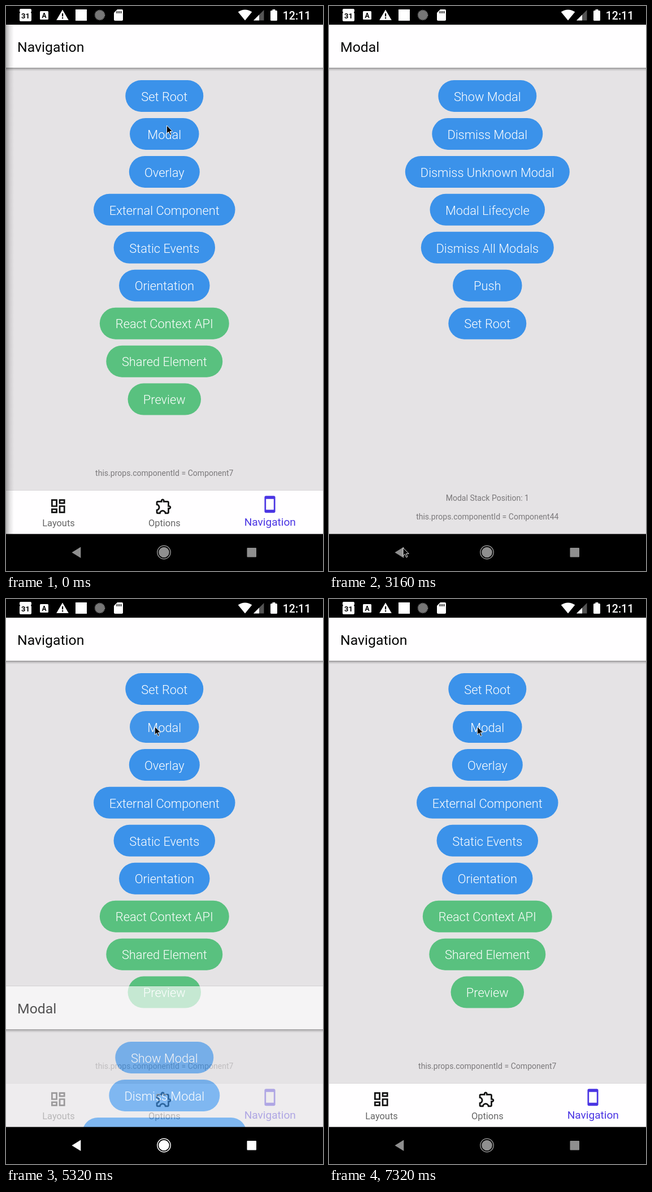
An HTML page for the animation above (7.36 s loop, 561 by 998 pixels).

```html
<!DOCTYPE html>
<html lang="en">
<head>
<meta charset="utf-8">
<title>Modal navigation</title>
<style>
  html, body { margin: 0; width: 100%; height: 100%; overflow: hidden; background: #000; }
  svg { display: block; width: 100vw; height: 100vh; font-family: Roboto, "Noto Sans", sans-serif; }
  .title { font-size: 24.8px; fill: #050505; }
  .label { font-size: 21.84px; font-weight: 300; fill: #fff; text-anchor: middle; }
  .note { font-size: 14.05px; fill: #7b797b; text-anchor: middle; }
  .tab { font-size: 16.4px; fill: #666; text-anchor: middle; }
  .tab.on { font-size: 19.1px; fill: #4a35e3; }
</style>
</head>
<body>
<svg id="stage" viewBox="0 0 561 998" xmlns="http://www.w3.org/2000/svg">
  <defs>
    <clipPath id="window"><rect y="32" width="561" height="901"/></clipPath>
    <linearGradient id="drop" x2="0" y2="1">
      <stop stop-opacity=".95"/><stop offset=".45" stop-opacity=".4"/><stop offset="1" stop-opacity="0"/>
    </linearGradient>
    <linearGradient id="edge">
      <stop stop-opacity=".3"/><stop offset=".5" stop-opacity=".1"/><stop offset="1" stop-opacity="0"/>
    </linearGradient>
  </defs>

  <g clip-path="url(#window)">
    <g id="home"></g>
    <g id="modal"></g>
    <rect id="drawer" y="33" width="14" height="900" fill="url(#edge)"/>
  </g>

  <g id="status" fill="#fff">
    <rect width="561" height="32.600" fill="#000"/>
    <path d="M26 5h17q2 0 2 2v3q-2 1 0 3v12q0 2-2 2h-17q-2 0-2-2v-12q2-2 0-3v-3q0-2 2-2z"/>
    <text x="34.5" y="22" font-size="13" font-weight="700" text-anchor="middle" fill="#000">31</text>
    <rect x="60" y="9" width="15" height="15" rx="1.5"/>
    <text x="67.5" y="21" font-size="12" font-weight="700" text-anchor="middle" fill="#000">A</text>
    <path d="M100 6.500l10.800 18.500h-21.600z"/>
    <path d="M99 13h2.200v5.500h-2.200zm0 7h2.200v2.200h-2.200z" fill="#000"/>
    <rect x="123" y="6" width="20" height="20"/>
    <circle cx="166" cy="16" r="8" fill="#777"/>
    <circle cx="166" cy="16" r="8.500" fill="none" stroke="#aaa" stroke-width="1.500" stroke-dasharray="1.300 1.300"/>
    <path d="M197 6h8q2 0 2 2v16q0 2-2 2h-12q-2 0-2-2v-12z"/>
    <path d="M196.500 9v4m3.500-4v4m3.500-4v4" stroke="#000" stroke-width="1.600"/>
    <path d="M423 25.500l-12.300-15q12.300-8 24.600 0z"/>
    <path d="M456.500 7v18.500h-18.500z" fill="#555"/>
    <path d="M448 15.500v10h-10z"/>
    <path d="M471.500 8v-2h5v2h2q1.500 0 1.500 1.500v15q0 1.500-1.500 1.500h-9q-1.500 0-1.500-1.500v-15q0-1.500 1.500-1.500z"/>
    <text x="514.500" y="23.500" font-size="19.500" font-weight="500" text-anchor="middle">12:11</text>
  </g>

  <rect y="932.600" width="561" height="65.400"/>
  <rect id="ripple" x="51" y="933" width="147" height="65" rx="30" fill="#151417"/>
  <g id="keys">
    <path d="M116.500 965.300l15.800-9.800v19.600z"/>
    <circle cx="279.500" cy="965" r="9.300"/>
    <circle cx="279.500" cy="965" r="11.700" fill="none" class="ring" stroke-width="1.500"/>
    <rect x="426.500" y="957" width="16.500" height="16.500" rx="1"/>
  </g>

  <path id="cursor" d="M0 0v14.200l3.300-3 2.400 5.600 2.300-1-2.400-5.400h4.600z" fill="#000" stroke="#fff" stroke-width=".9"/>
</svg>

<script>
const LOOP = 7360, STEP = 40, TRAVEL = 965, CENTER = 280.3;
const BLUE = '#3b92ea', GREEN = '#59c17f';
const $ = id => document.getElementById(id);
const clamp = v => Math.max(0, Math.min(1, v));
const span = (t, start, length) => clamp((t - start) / length);
const easeInOut = p => p < .5 ? 2 * p * p : 1 - 2 * (1 - p) ** 2;
const decelerate = p => 1 - (1 - p) ** 2;

const button = ([label, width, color = BLUE], i) => {
  const y = 131 + i * 66.95;
  return `<g class="button">
    <rect x="${CENTER - width / 2}" y="${y}" width="${width}" height="56" rx="28" fill="${color}"/>
    <text class="label" x="${CENTER}" y="${y + 36.7}">${label}</text></g>`;
};

const screen = (title, buttons) => `
  <rect y="33" width="561" height="965" fill="#e5e3e5"/>
  <rect class="shadow" y="109" width="561" height="6" fill="url(#drop)" opacity=".38"/>
  <rect y="32" width="561" height="1" opacity=".13"/>
  <rect y="33" width="561" height="76" fill="#fffeff"/>
  <text class="title" x="20" y="81">${title}</text>
  ${buttons.map(button).join('')}`;

const note = (y, text, id = '') => `<text class="note" id="${id}" x="${CENTER}" y="${y}">${text}</text>`;

const icon = (x, y, color, d) =>
  `<path transform="translate(${x} ${y}) scale(1.365) translate(-12 -12)" fill="${color}" fill-rule="evenodd" d="${d}"/>`;

const DASHBOARD = 'M3 3h8v10h-8zM5 5v6h4v-6zM13 3h8v6h-8zM15 5v2h4v-2zM13 11h8v10h-8zM15 13v6h4v-6zM3 15h8v6h-8zM5 17v2h4v-2z';
const PUZZLE = 'M10.5 4.5c.28 0 .5.22.5.5v2h6v6h2c.28 0 .5.22.5.5s-.22.5-.5.5h-2v6h-2.120c-.68-1.750-2.390-3-4.380-3s-3.700 1.250-4.380 3H4v-2.120c1.750-.68 3-2.390 3-4.380 0-1.990-1.240-3.700-2.990-4.380L4 7h6V5c0-.28.22-.5.5-.5m0-2C9.120 2.500 8 3.620 8 5H4c-1.100 0-2 .9-2 2v3.800h.3c1.490 0 2.700 1.210 2.700 2.700s-1.210 2.700-2.700 2.700H2V20c0 1.100.9 2 2 2h3.800v-.3c0-1.490 1.210-2.700 2.700-2.700s2.700 1.210 2.700 2.700v.3H17c1.100 0 2-.9 2-2v-4c1.380 0 2.500-1.120 2.500-2.500S20.380 11 19 11V7c0-1.100-.9-2-2-2h-4c0-1.380-1.120-2.500-2.500-2.500z';
const PHONE = 'M7 1h10q2 0 2 2v18q0 2-2 2h-10q-2 0-2-2v-18q0-2 2-2zM7 5v14h10v-14z';

$('home').innerHTML = screen('Navigation', [
  ['Set Root', 138], ['Modal', 122.5], ['Overlay', 125], ['External Component', 250.5],
  ['Static Events', 179.5], ['Orientation', 160.5], ['React Context API', 229, GREEN],
  ['Shared Element', 206, GREEN], ['Preview', 129.5, GREEN]
]) + note(830, 'this.props.componentId = Component7') + `
  <rect y="855" width="561" height="1" opacity=".05"/>
  <rect y="856" width="561" height="77" fill="#fffeff"/>
  ${icon(92.3, 883.5, '#111', DASHBOARD)}${icon(279.3, 883.5, '#111', PUZZLE)}${icon(467, 880.3, '#4a35e3', PHONE)}
  <text class="tab" x="93" y="918.500">Layouts</text>
  <text class="tab" x="280.300" y="918.500">Options</text>
  <text class="tab on" x="467.300" y="918">Navigation</text>`;

$('modal').innerHTML = screen('Modal', [
  ['Show Modal', 174], ['Dismiss Modal', 196], ['Dismiss Unknown Modal', 291], ['Modal Lifecycle', 203.5],
  ['Dismiss All Modals', 235], ['Push', 122.5], ['Set Root', 138]
]) + note(874, 'Modal Stack Position: 1') + note(907, '', 'componentId');

const modalButton = $('home').querySelectorAll('.button')[1];
const dismissButton = $('modal').querySelectorAll('.button')[1];
const modalShadow = $('modal').querySelector('.shadow');
const ring = document.querySelector('.ring');

const visits = [
  { show: 1736, hide: 3420, id: 44 },
  { show: 5270, hide: 6900, id: 48 }
];

// time, x, y of the pointer tip
const pointer = [
  [0, 284.5, 211], [700, 279, 221.5], [1700, 279, 221.5], [2000, 222, 294.5], [2280, 215, 300],
  [2960, 131, 957], [3680, 131, 957], [3800, 137, 932], [4480, 263.5, 225.5], [LOOP, 262.5, 225.5]
];

function pointerAt(t) {
  const i = pointer.findIndex(p => p[0] > t);
  const [t0, x0, y0] = pointer[i - 1], [t1, x1, y1] = pointer[i];
  const p = easeInOut((t - t0) / (t1 - t0));
  return [x0 + (x1 - x0) * p, y0 + (y1 - y0) * p];
}

function pressOpacity(t, down, up) {
  const depth = .8 * easeInOut(span(Math.min(t, up), down, 130));
  return 1 - depth * (1 - easeInOut(span(t, up, 250)));
}

function drawModal(t) {
  const visit = visits.find(v => t >= v.show && t < v.hide + 300);
  $('modal').setAttribute('visibility', visit ? 'visible' : 'hidden');
  if (!visit) return;
  const offset = TRAVEL * (1 - decelerate(span(t, visit.show, 280)) + span(t, visit.hide, 300) ** 2);
  $('modal').setAttribute('transform', `translate(0 ${Math.round(offset)})`);
  $('modal').setAttribute('opacity', decelerate(span(t, visit.show, 122)));
  modalShadow.setAttribute('opacity', .38 + .14 * clamp(offset / 500));
  $('componentId').textContent = `this.props.componentId = Component${visit.id}`;
}

function draw(t) {
  drawModal(t);
  modalButton.setAttribute('opacity', Math.min(pressOpacity(t, 1300, 1430), pressOpacity(t, 4980, 5113)));
  dismissButton.setAttribute('opacity', pressOpacity(t, 6540, 6670));
  $('drawer').setAttribute('visibility', t < 80 ? 'visible' : 'hidden');

  const lit = span(t, 3240, 100) * (1 - span(t, 5500, 400));
  const level = Math.round(143 + 112 * lit);
  const color = `rgb(${level},${level},${level})`;
  $('keys').setAttribute('fill', color);
  ring.setAttribute('stroke', color);
  $('ripple').setAttribute('opacity', span(t, 3240, 120) * (1 - span(t, 3660, 120)));

  const [x, y] = pointerAt(t);
  $('cursor').setAttribute('transform', `translate(${x.toFixed(2)} ${y.toFixed(2)})`);
}

const start = performance.now();
function tick() {
  const elapsed = performance.now() - start + 6;
  draw(Math.floor(elapsed / STEP) * STEP % LOOP);
  requestAnimationFrame(tick);
}
draw(0);
requestAnimationFrame(tick);
</script>
</body>
</html>
```
